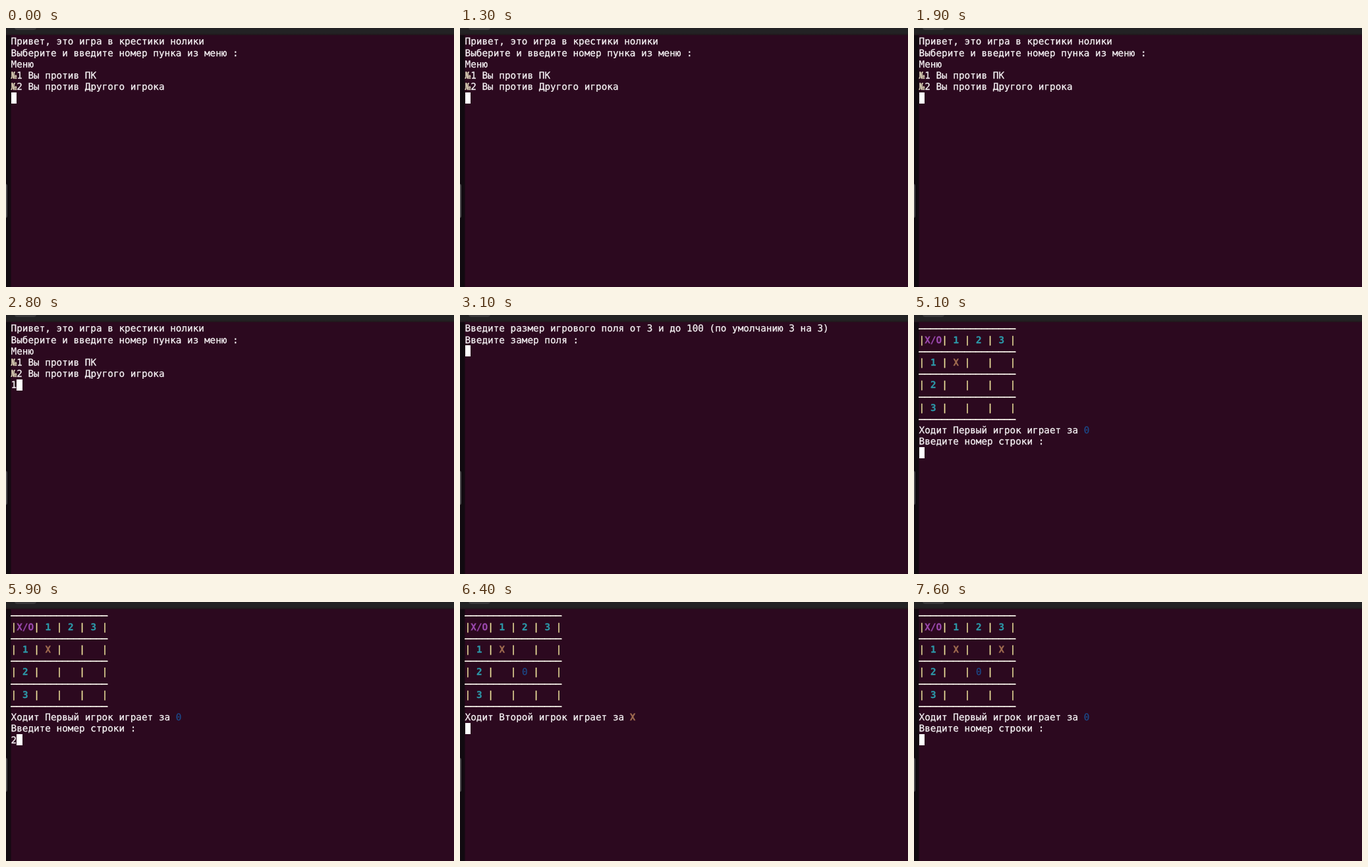
Animation, 680 px wide and 394 px high, one loop 8 s. Source, as an HTML page:

```html
<!DOCTYPE html>
<html lang="ru">
<head>
<meta charset="utf-8">
<title>Крестики нолики</title>
<style>
  html, body { margin: 0; width: 100%; height: 100%; overflow: hidden; background: #2c091f; }
  #stage { position: absolute; left: 0; top: 0; width: 680px; height: 394px; overflow: hidden; background: #2c091f; }
  #stage div { position: absolute; }
  #bar { left: 0; top: 0; width: 680px; height: 11px; background: linear-gradient(#232224 0 70%, #211a1d 90%, #260f1d); }
  #tab { left: 13px; top: -6px; width: 33px; height: 9px; border-radius: 4px; background: #3b3a3c; }
  #edge { left: 0; top: 10px; width: 8px; height: 384px; background: linear-gradient(90deg, #110a10 0 75%, #220819); }
  #grip { left: -4px; top: 237px; width: 6px; height: 52px; border-radius: 3px; background: #4b484b; }
  #screen div {
    white-space: pre; height: 17.2px; line-height: 17.2px; color: #f8f5f7;
    font-family: "DejaVu Sans Mono", monospace; font-size: 14.334px;
    text-rendering: geometricPrecision; font-kerning: none;
    -webkit-text-stroke: 0.25px;
  }
  #cursor { width: 8.6px; height: 17px; background: #fff; }
  .num { color: #efe9c8; }
  .bar { color: #ece09a; -webkit-text-stroke: 0.4px; }
  .rule { color: #f8f4ea; -webkit-text-stroke: 0.7px; }
  .title { color: #9a48ac; font-weight: bold; }
  .idx { color: #2c98a8; font-weight: bold; }
  .x { color: #a06c50; font-weight: bold; }
  .o { color: #1c4a8a; }
</style>
</head>
<body>
<div id="stage">
  <div id="edge"></div><div id="grip"></div>
  <div id="bar"></div><div id="tab"></div>
  <div id="screen"></div>
  <div id="cursor"></div>
</div>
<script>
const LOOP = 8000, LEFT = 7.6, TOP = 12, COL = 8.63, ROW = 17.2;
const DROP = 1.4; // glyphs sit a little low in their cells
const screenEl = document.getElementById('screen');
const cursor = document.getElementById('cursor');

const tint = (cls, text) => `<span class="${cls}">${text}</span>`;
const PIPE = tint('bar', '|');
const RULE = tint('rule', '—'.repeat(17));
const MARK = { X: tint('x', 'X'), 0: tint('o', '0'), '.': ' ' };

const menu = [
  'Привет, это игра в крестики нолики',
  'Выберите и введите номер пунка из меню :',
  'Меню',
  tint('num', '№') + '1 Вы против ПК',
  tint('num', '№') + '2 Вы против Другого игрока'
];
const size = [
  'Введите размер игрового поля от 3 и до 100 (по умолчанию 3 на 3)',
  'Введите замер поля :'
];
const askRow = 'Введите номер строки :';
const askCol = 'Введите номер столбца :';

function tableRow(head, cells) {
  return PIPE + head + PIPE + cells.map(c => ` ${c} ${PIPE}`).join('');
}

// cells: nine characters, row by row
function board(cells, who, mark) {
  const lines = [RULE, tableRow(tint('title', 'X/O'), [1, 2, 3].map(n => tint('idx', n)))];
  for (let r = 0; r < 3; r++) {
    const row = [...cells.slice(r * 3, r * 3 + 3)].map(c => MARK[c]);
    lines.push(RULE, tableRow(` ${tint('idx', r + 1)} `, row));
  }
  lines.push(RULE, `Ходит ${who} игрок играет за ${MARK[mark]}`);
  return lines;
}

const second = cells => board(cells, 'Второй', 'X');
const first = cells => [...board(cells, 'Первый', '0'), askRow];
const turn = first('X........');

// start time, finished lines, text typed on the input line
const steps = [
  [0, menu, ''],
  [2800, menu, '1'],
  [3000, size, ''],
  [3700, size, '3'],
  [4100, second('.........'), ''],
  [4700, turn, ''],
  [5900, turn, '2'],
  [6100, [...turn, '2', askCol], ''],
  [6300, [...turn, '2', askCol], '2'],
  [6400, second('X...0....'), ''],
  [7100, first('X.X.0....'), '']
];

function show([, lines, typed]) {
  screenEl.innerHTML = [...lines, typed].map((line, i) =>
    `<div style="left:${LEFT}px;top:${TOP + DROP + i * ROW}px">${line}</div>`).join('');
  cursor.style.left = LEFT + typed.length * COL + 'px';
  cursor.style.top = TOP + lines.length * ROW + 'px';
}

let current = null;
const start = performance.now();

function frame() {
  const t = (performance.now() - start) % LOOP;
  const step = steps.filter(s => s[0] <= t).pop();
  if (step !== current) show(current = step);
  requestAnimationFrame(frame);
}
frame();
</script>
</body>
</html>
```
